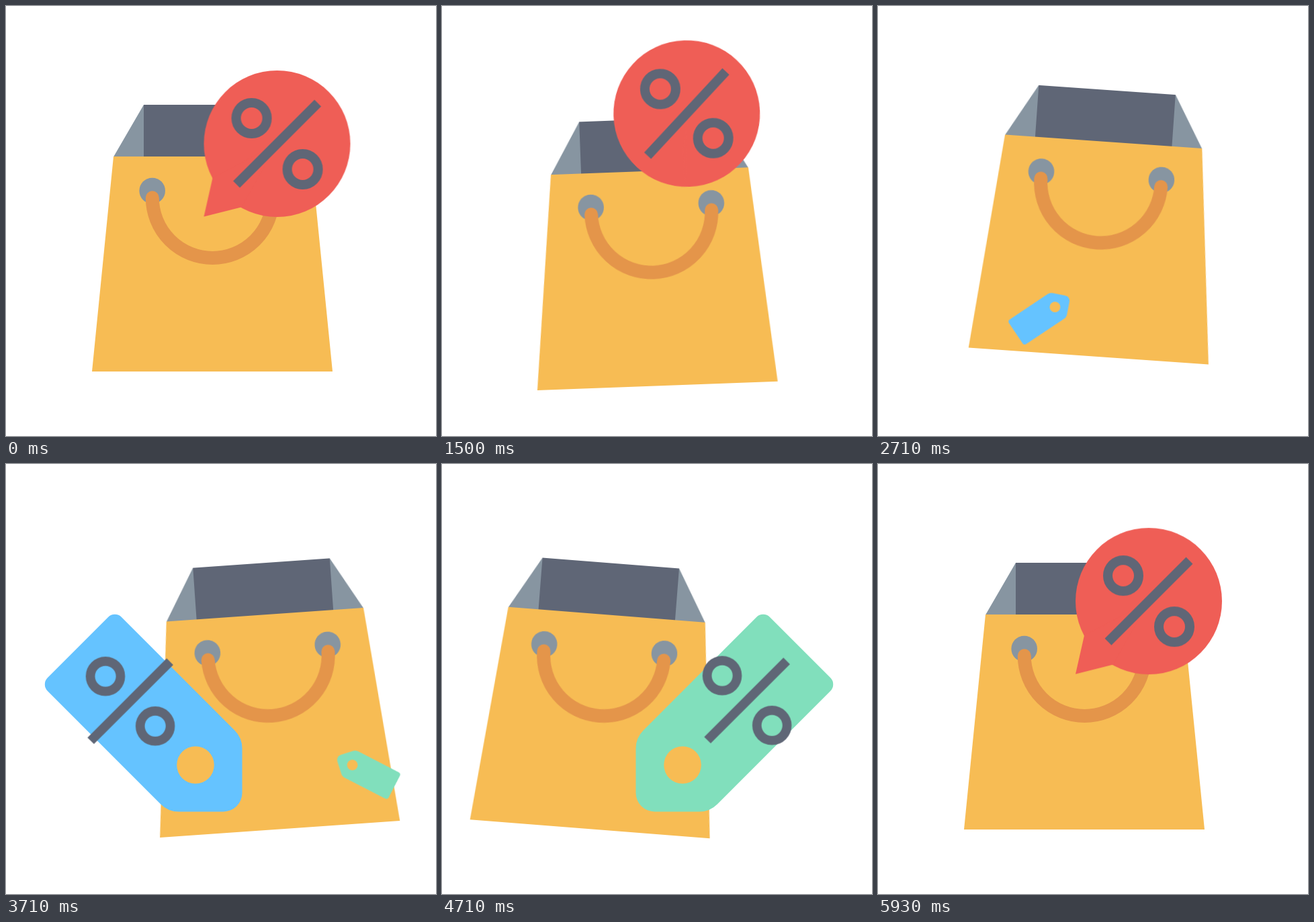
Animation of 640x640 px, one loop 6 s. Source, as an HTML page:

```html
<!DOCTYPE html>
<html lang="en">
<head>
<meta charset="utf-8">
<title>Shopping bag offers</title>
<style>
  html, body { margin: 0; width: 100%; height: 100%; overflow: hidden; background: #fff; }
  svg { display: block; width: 100vw; height: 100vh; }

  .anim { animation: 6s cubic-bezier(.333, 0, .667, 1) infinite both; }

  /* Bag: drop, hop, sway right, sway left, settle */
  .bag { animation-name: bag; }
  @keyframes bag {
    0%, 20% { transform: translate(307px, 320px) rotate(0deg); }
    31.17% { transform: translate(320px, 371px) rotate(-5deg); }
    42.33%, 43% { transform: translate(320px, 295px) rotate(5deg); }
    54.17%, 59.67% { transform: translate(410px, 320px) rotate(-5deg); }
    70.83%, 76.33% { transform: translate(230px, 320px) rotate(5deg); }
    87.5%, 100% { transform: translate(307px, 320px) rotate(0deg); }
  }

  /* Balloon: jumps into the bag and back out, in bag coordinates */
  .balloon { animation-name: jump; }
  @keyframes jump {
    0%, 20% { transform: translate(403.5px, 205px); }
    28.33% { transform: translate(345px, 106px); animation-timing-function: cubic-bezier(.33, 0, .67, 0); }
    33.33% { transform: translate(326px, 149px); animation-timing-function: cubic-bezier(.33, .26, .67, .6); }
    39.17%, 79.17% { transform: translate(310px, 345px); animation-timing-function: cubic-bezier(.33, .67, .67, 1); }
    93.33% { transform: translate(345px, 107px); }
    99.17%, 100% { transform: translate(403.5px, 205px); }
  }

  .layer { animation-timing-function: step-end; }
  .front { animation-name: front; }
  .behind { animation-name: behind; }
  @keyframes front {
    0%, 93.33%, 100% { visibility: visible; }
    28.33% { visibility: hidden; }
  }
  @keyframes behind {
    0%, 39.17%, 93.33%, 100% { visibility: hidden; }
    28.33%, 79.17% { visibility: visible; }
  }

  .pulse { animation-name: pulse; transform-origin: -109px 108.5px; }
  @keyframes pulse {
    0%, 20%, 100% { transform: scale(1); }
    10.33% { transform: scale(1.2); }
    16% { transform: scale(.9); }
  }
  .soften { animation-name: soften; }
  @keyframes soften {
    0%, 20%, 100% { transform: scale(1); }
    10.33% { transform: scale(.917); }
    16% { transform: scale(1.055); }
  }
  .tail { animation-name: tail; }
  @keyframes tail {
    0%, 22%, 95%, 100% { transform: scaleX(1); }
    28.33%, 87% { transform: scaleX(-1); }
  }

  /* Tags: the second follows the first by one second */
  .blue { --from: 256px; --to: 282px; --turn: -110deg; fill: #65c3ff; }
  .green { --from: 578px; --to: 358px; --turn: 101deg; fill: #81dfbc; }
  .tag { animation-name: tag; }
  .late { animation-delay: -5s; }
  @keyframes tag {
    0%, 41.67% { transform: translate(var(--from), 448px) rotate(var(--turn)) scale(0); }
    51.67%, 62.17% { transform: translate(var(--to), 448px) rotate(0deg) scale(1); }
    68%, 100% { transform: translate(var(--to), 448px) rotate(0deg) scale(0); }
  }
  .sign { animation-name: sign; }
  @keyframes sign {
    0%, 50% { transform: scale(0); }
    56%, 62.17% { transform: scale(.975); }
    66%, 100% { transform: scale(0); }
  }
</style>
</head>
<body>
<svg viewBox="0 0 640 640">
  <defs>
    <g id="percent" fill="none" stroke="#5f6676" stroke-width="14">
      <path d="M-60.5 60.5L60.5-60.5"/>
      <circle cx="-38" cy="-38" r="23"/>
      <circle cx="38" cy="38" r="23"/>
    </g>
    <path id="label" fill-rule="evenodd" d="M-110-220L58.4-51.6A38 38 0 0 1 69.5-24.8V41.5A28 28 0 0 1 41.5 69.5H-24.8A38 38 0 0 1-51.6 58.4L-220-110A14 14 0 0 1-220-130L-130-220A14 14 0 0 1-110-220ZM-27.8 0A27.8 27.8 0 0 0 27.8 0A27.8 27.8 0 0 0-27.8 0Z"/>
  </defs>

  <g class="anim bag">
    <g transform="translate(-307 -320)">
      <path fill="#8795a1" d="M160 224.5L205 147H409L454 224.5Z"/>
      <path fill="#5f6676" d="M205 147H409V224.5H205Z"/>

      <g id="inside" class="anim layer behind">
        <g class="anim balloon">
          <g class="anim pulse">
            <g fill="#ef5e56">
              <circle r="109"/>
              <path class="anim tail" d="M0 0L-96 51L-109 108.5L-53.5 94.5Z"/>
            </g>
            <g class="anim soften"><use href="#percent"/></g>
          </g>
        </g>
      </g>

      <path fill="#f7bc54" d="M160 224H454L486 544H128Z"/>
      <g fill="#8795a1">
        <circle cx="217.7" cy="275" r="19.3"/>
        <circle cx="397" cy="275" r="19.3"/>
      </g>
      <path id="handle" fill="none" stroke="#e4954a" stroke-width="20" stroke-linecap="round"
        d="M217.8 285.3A89.6 89.6 0 0 0 397 285.3"/>
    </g>
  </g>

  <g class="anim tag blue"><use href="#label"/></g>
  <g transform="translate(185 353)"><g class="anim sign"><use href="#percent"/></g></g>

  <g class="anim tag green late"><use href="#label" transform="scale(-1 1)"/></g>
  <g transform="translate(454 352)"><g class="anim sign late"><use href="#percent"/></g></g>
</svg>
<script>
  // A second balloon in front of the bag shares the same motion.
  const outside = document.getElementById('inside').cloneNode(true);
  outside.id = 'outside';
  outside.classList.replace('behind', 'front');
  document.getElementById('handle').after(outside);
</script>
</body>
</html>
```
